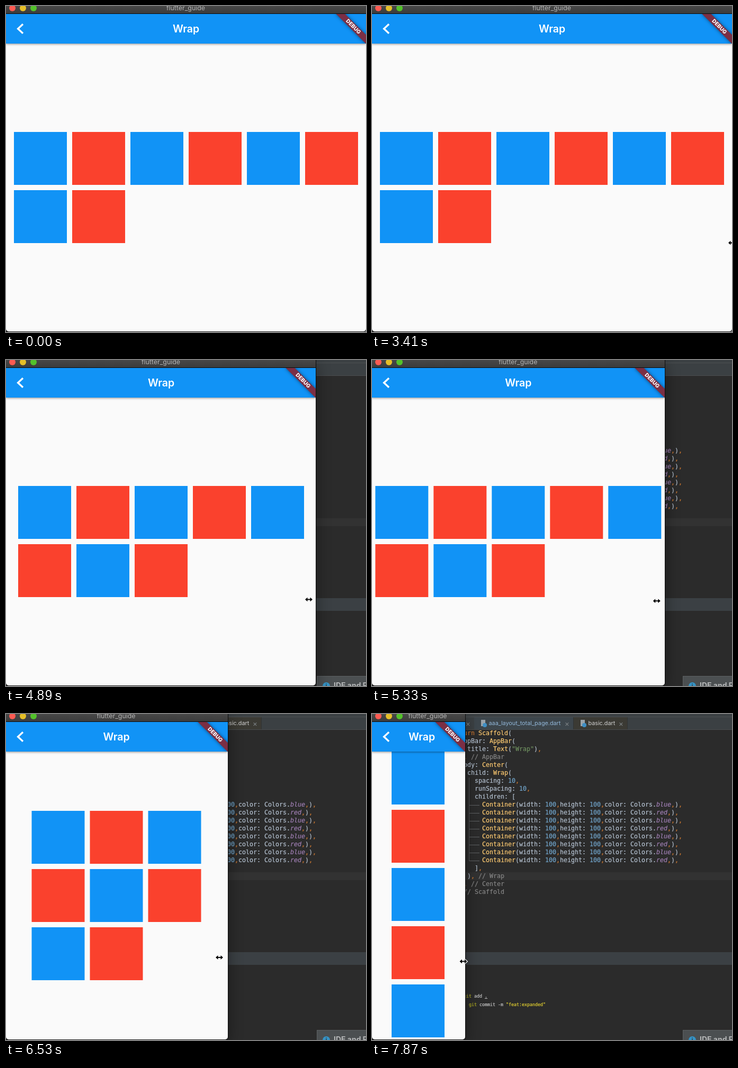
An HTML page that plays this animation: 680x616 px, repeating every 8 s.

```html
<!DOCTYPE html>
<html lang="en">
<head>
<meta charset="utf-8">
<title>Wrap layout</title>
<style>
html, body { margin: 0; width: 100%; height: 100%; overflow: hidden; background: #2b2b2b; }
body, body * { box-sizing: border-box; }
body > *, #win > *, #bar > * { position: absolute; }
body { font: 10.8px Inter, sans-serif; white-space: nowrap; }

/* editor behind the window */
#strip { left: 0; top: 0; width: 680px; height: 30px; background: #3b4043; border-bottom: 1px solid #4a4d4f; }
#strip::before { content: ""; position: absolute; top: 5px; width: 100%; height: 1px; background: #4d5153; }
.tab { position: absolute; top: 6px; height: 23px; line-height: 23px; padding-left: 27.5px; border-right: 1px solid #2f3234; }
.tab::before { content: ""; position: absolute; left: 13px; top: 5px; width: 8px; height: 12px; background: #9aa3a9; }
.tab::after { content: ""; position: absolute; left: 16px; top: 11px; width: 8px; height: 8px; border-radius: 50%; background: #3f8fc4; }
.tab i { position: absolute; right: 7px; top: 0; font: 14px/23px Inter, sans-serif; color: #7c8285; }
.row { left: 0; width: 680px; }
pre { margin: 0; font: 11.63px/15px "DejaVu Sans Mono", monospace; color: #b4c1d0; -webkit-text-stroke: .2px; }
#code { left: 152px; top: 29px; }
.note { color: #858585; } .str { color: #6f9060; } .key { color: #cc7832; }
.num { color: #70a3c8; } .prop { color: #a07fb4; font-style: italic; } .type { color: #ffcb72; }
#guide { left: 183px; top: 120px; width: 20px; height: 158px; padding-top: 38px; border-left: 1px solid #55585a;
  background: repeating-linear-gradient(transparent 0 14px, #606365 14px 15px) content-box content-box; }
#term { left: 173px; top: 525px; font-size: 8.3px; line-height: 16px; color: #c4c4c4; }
#term b { font-weight: 400; color: #b2ae22; }
#term s { text-decoration: none; color: #e0cd30; }
#tip { left: 587px; top: 597px; width: 93px; height: 19px; background: #4b4f51; border: solid #5c6062; border-width: 1px 0 0 1px;
  font: 700 14px/34px Inter, sans-serif; color: #b4b6b7; padding-left: 31px; overflow: hidden; }
#tip::before { content: "i"; position: absolute; left: 10px; top: 11px; width: 14px; height: 14px; border-radius: 50%;
  background: #3592c4; color: #333; font: 700 11px/14px Inter, sans-serif; text-align: center; }

/* resizable window */
#win { left: 0; top: 0; height: 615px; background: #fafafa; overflow: hidden; border-radius: 0 0 5px 5px;
  box-shadow: 0 0 0 1px #0c0c0c, 0 8px 28px rgba(0, 0, 0, .42); }
#head { left: 0; top: 0; width: 100%; height: 15px; background: linear-gradient(#474747, #3c3c3c); border-bottom: 1px solid #0b0b0b; }
.light { top: -2px; width: 12px; height: 12px; border-radius: 50%; }
#name { top: -3px; font-size: 12.4px; line-height: 14px; color: #b4b4b4; transform: translateX(-50%); }
#wrap { left: 0; top: 0; display: flex; flex-wrap: wrap; gap: 10px; }
#wrap div { width: 100px; height: 100px; background: #1193f6; }
#wrap div:nth-child(even) { background: #fa412d; }
#bar { left: 0; top: 15px; width: 100%; height: 56px; background: #1193f6; box-shadow: 0 1px 4px rgba(0, 0, 0, .45); }
#title { top: 0; font: 600 19.5px/56px Inter, sans-serif; color: #fff; transform: translateX(-50%); }
#clip { inset: 0; overflow: hidden; }
#debug { position: absolute; right: -40px; top: 28px; width: 80px; height: 12px; background: #7b2f45; color: #fff;
  font: 800 10px/10px Inter, sans-serif; text-align: center; transform: rotate(45deg); transform-origin: 40px -28px;
  box-shadow: 0 0 6px rgba(0, 0, 0, .5); }
svg { left: 0; top: 0; }
</style>
</head>
<body>
<div id="strip">
  <div class="tab" style="left:100px;width:94px"><i>×</i></div>
  <div class="tab" style="left:193px;width:188px;background:#3d464c;color:#92b8da">aaa_layout_total_page.dart<i>×</i></div>
  <div class="tab" style="left:381px;width:102px;background:#3b3a34;color:#d2d2d2">basic.dart<i>×</i></div>
</div>
<div class="row" style="top:299px;height:15px;background:#323232"></div>
<div class="row" style="top:450px;height:24px;background:#3b4044"></div>
<pre id="code"></pre>
<div id="guide"></div>
<pre id="term"><b>git</b> add <u>.</u>
  <b>git</b> commit -m <s>"feat:expanded"</s></pre>
<div id="tip">IDE and Plugin Updates</div>

<div id="win">
  <div id="wrap"></div>
  <div id="bar">
    <svg width="56" height="56"><path d="M32 19.2 22.6 28l9.4 8.8" fill="none" stroke="#fff" stroke-width="3.4"/></svg>
    <div id="title">Wrap</div>
    <div id="clip"><div id="debug">DEBUG</div></div>
  </div>
  <div id="head"></div>
  <div class="light" style="left:6px;background:#fe5b52"></div>
  <div class="light" style="left:26px;background:#e6bf28"></div>
  <div class="light" style="left:46px;background:#53c22b"></div>
  <div id="name">flutter_guide</div>
</div>
<svg width="680" height="616"><path id="cursor" stroke="#fff" stroke-width="2.4" paint-order="stroke"/></svg>

<script>
const $ = id => document.getElementById(id);
const LOOP = 8000, STEP = 148.46;
const ARROW = "M0 0v14l3-3 2.5 5.5 2.5-1-2.5-5.5h4.5z";
const RESIZE = "M-7 0l4.5-4v3h5v-3l4.5 4-4.5 4v-3h-5v3z";

// step, window width, layout width, cursor x, cursor y
const KEYS = [
  [-1, 680, 680, 680, 447.5],
  [0, 676, 676, 673, 448],
  [6, 585, 586, 572, 452.5],
  [7, 569, 569, 555, 454],
  [12, 488, 487, 469, 460.5],
  [15, 432, 432, 416, 460],
  [17, 419, 417, 403, 460],
  [22, 268, 267, 260.5, 472.5],
  [24, 228, 228, 223, 470],
  [26, 176, 174, 172.5, 467.5]
];

const boxes = Array(8).fill("Container(width: 100,height: 100,color: Colors.COLOR,),")
  .map((s, i) => "        " + s.replace("COLOR", i % 2 ? "red" : "blue"));
const source = [
  "return Scaffold(", "  appBar: AppBar(", '    title: Text("Wrap"),', "  ), // AppBar",
  "  body: Center(", "    child: Wrap(", "      spacing: 10,", "      runSpacing: 10,", "      children: [",
  ...boxes, "      ],", "    ), // Wrap", "  ), // Center", "); // Scaffold"
].join("\n");
const styles = ["note", "str", "key", "num", "prop", "type"];
const token = /(\/\/.*)|(".*?")|(return|[,;])|(\b\d+)|((?<=\.)\w+)|(\b[A-Z]\w+(?=\())/g;
$("code").innerHTML = source.replace(token, (s, ...groups) =>
  `<span class="${styles[groups.findIndex(g => g)]}">${s}</span>`);
$("wrap").innerHTML = "<div></div>".repeat(8);

function pose(step) {
  const i = Math.max(1, KEYS.findIndex(k => k[0] >= step));
  const a = KEYS[i - 1], b = KEYS[i], p = (step - a[0]) / (b[0] - a[0]);
  return a.map((v, j) => v + (b[j] - v) * p);
}

function showCursor(shape, x, y) {
  $("cursor").setAttribute("d", shape);
  $("cursor").setAttribute("transform", `translate(${x} ${y})`);
}

function draw(t) {
  const step = Math.min(26, Math.max(-1, Math.floor((t - 3995) / STEP)));
  const [, width, inner, x, y] = pose(step);
  const cols = Math.floor((inner + 10) / 110), rows = Math.ceil(8 / cols);
  const w = cols * 110 - 10, h = rows * 110 - 10;
  $("win").style.width = width + "px";
  // a transform keeps half-pixel positions
  $("wrap").style.width = w + "px";
  $("wrap").style.transform = `translate(${(inner - w) / 2}px, ${Math.max(71, 343 - h / 2)}px)`;
  $("title").style.left = Math.max(94, inner / 2) + "px";
  $("name").style.left = Math.max(105, inner / 2 - 0.5) + "px";

  const pass = Math.floor((t - 870) / 150);
  if (t >= 3405) showCursor(RESIZE, x, y);
  else if (pass >= 0 && pass < 4) showCursor(ARROW, 309 + pass * 119, 602 - pass * 52);
  else showCursor("", 0, 0);
}

const start = performance.now();
function tick() {
  draw((performance.now() - start) % LOOP);
  requestAnimationFrame(tick);
}
tick();
</script>
</body>
</html>
```
